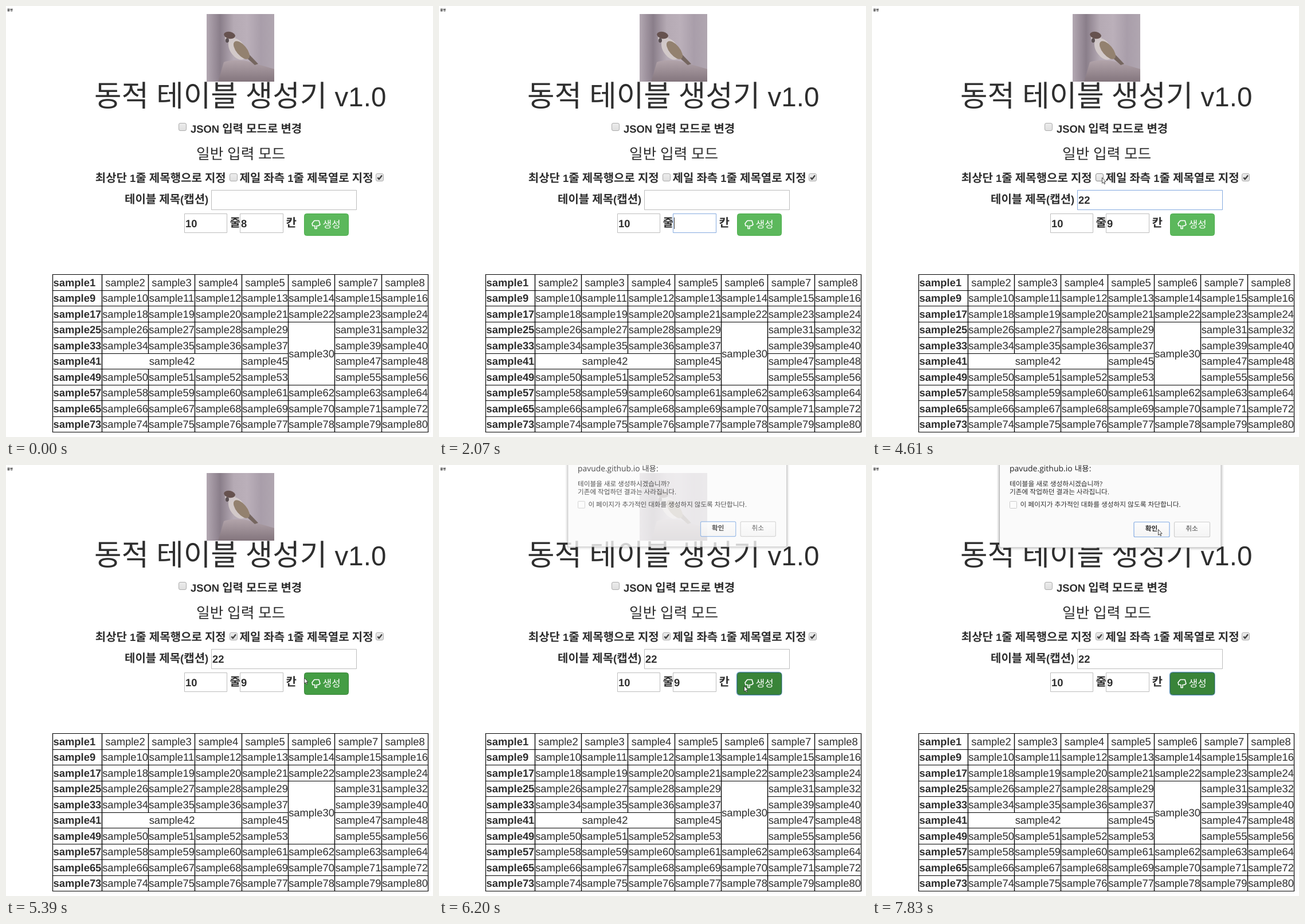
Write an HTML page with a canvas that moves like this. It is 745 px wide and 752 px high and loops after 8000 ms.

```html
<!DOCTYPE html>
<html lang="ko">
<head>
<meta charset="utf-8">
<title>동적 테이블 생성기</title>
<style>
html, body { margin: 0; height: 100%; overflow: hidden; background: #fff; }
canvas { display: block; }
</style>
</head>
<body>
<canvas id="stage" width="745" height="752"></canvas>
<script>
const ctx = document.getElementById('stage').getContext('2d');
ctx.textRendering = 'geometricPrecision';
const LOOP = 8000, STEP = 70, INK = '#2e2e2e';

// Each glide eases out for `time` ms, then rests until `end`.
const glides = [
  { start: 460, time: 210, end: 900, from: [669, 0], to: [502, 289], power: 1 },
  { start: 3800, time: 350, end: 4750, from: [452, 308], to: [401, 299], power: 2 },
  { start: 4750, time: 210, end: 5020, from: [401, 299], to: [450, 310], power: 1 },
  { start: 5250, time: 550, end: 6550, from: [503, 352], to: [532, 385], power: 3 },
  { start: 6790, time: 900, end: 8000, from: [546, 220], to: [499, 112], power: 6 }
];

const stepped = (t, start) => Math.floor((t - start) / STEP) * STEP;

function pointer(t) {
  const g = glides.find(g => t >= g.start && t < g.end);
  if (!g) return null;
  const p = Math.min(1, stepped(t, g.start) / g.time);
  const eased = 1 - (1 - p) ** g.power;
  return g.from.map((v, i) => Math.round(v + (g.to[i] - v) * eased));
}

// Hangul runs use their own font, `ratio` times the Latin size.
function text(s, x, y, size, { weight = 400, align = 0, color = INK, latin = 'Liberation Sans', ratio = 1.087 } = {}) {
  const parts = s.match(/[가-힣]+|[^가-힣]+/g) || [];
  const fonts = parts.map(p => /[가-힣]/.test(p)
    ? `${weight} ${size * ratio}px "Noto Sans CJK KR", "Noto Sans CJK", sans-serif`
    : `${weight} ${size}px "${latin}", sans-serif`);
  const widths = parts.map((p, i) => (ctx.font = fonts[i], ctx.measureText(p).width));
  x -= align * widths.reduce((a, b) => a + b, 0);
  ctx.fillStyle = color;
  parts.forEach((p, i) => {
    ctx.font = fonts[i];
    ctx.fillText(p, x, y);
    x += widths[i];
  });
}

function paint(fill, stroke, line) {
  if (fill) { ctx.fillStyle = fill; ctx.fill(); }
  if (stroke) { ctx.strokeStyle = stroke; ctx.lineWidth = line; ctx.stroke(); }
}

function box(x, y, w, h, fill, stroke, radius = 0, line = 1) {
  ctx.beginPath();
  ctx.roundRect(x, y, w, h, radius);
  paint(fill, stroke, line);
}

function shape(path, x, y, fill, stroke, line = 1) {
  ctx.save();
  ctx.translate(x, y);
  const p = new Path2D(path);
  if (fill) { ctx.fillStyle = fill; ctx.fill(p); }
  if (stroke) { ctx.strokeStyle = stroke; ctx.lineWidth = line; ctx.lineJoin = 'round'; ctx.stroke(p); }
  ctx.restore();
}

function oval(x, y, rx, ry, turn, fill) {
  ctx.beginPath();
  ctx.ellipse(x, y, rx, ry, turn, 0, 7);
  paint(fill);
}

function gradient(x0, y0, x1, y1, ...colors) {
  const g = ctx.createLinearGradient(x0, y0, x1, y1);
  colors.forEach((c, i) => g.addColorStop(i / (colors.length - 1), c));
  return g;
}

function checkbox(x, y, checked, hover) {
  const fill = gradient(0, y, 0, y + 14, hover ? '#f2f2f2' : '#ededed', '#dedede');
  box(x + .5, y + .5, 13, 13, fill, hover ? '#8c8c8c' : '#adadad', 2.5);
  if (checked) shape('M3.3 7.2L5.8 10.2L11 3.5', x, y, null, '#404040', 2.4);
}

function input(x, y, w, h, value, focused, caret) {
  box(x + .5, y + .5, w, h, '#fff', focused ? '#86abe0' : '#bdbdbd');
  text(value, x + 2, y + 23.5, 18.4, { weight: 700 });
  if (caret) {
    ctx.fillStyle = '#333';
    ctx.fillRect(x + 2 + Math.round(value.length * 10.2), y + 7, 1, 20);
  }
}

function photo() {
  ctx.save();
  ctx.translate(350, 14);
  ctx.beginPath();
  ctx.rect(0, 0, 118, 118);
  ctx.clip();
  box(0, 0, 118, 118, gradient(0, 0, 118, 0, '#b3a8b2', '#8a7e8a', '#b5aab4', '#bbb0ba', '#a99eaa', '#b0a6b0'));
  shape('M20 118L30 84Q45 78 70 82L118 96V118Z', 0, 0, gradient(0, 80, 0, 118, '#b3a5ab', '#83757d'));
  shape('M58 66L68 64L90 87L84 89Z', 0, 0, '#75665f');
  oval(54, 61, 13, 21, -.6, '#d2c9c9');
  oval(61, 63, 9, 19, -.7, '#93816f');
  oval(41, 42, 9, 9, 0, '#d0c7c8');
  oval(40, 37, 10, 6, .2, '#66524f');
  oval(36, 46, 3, 4, 0, '#5a5053');
  ctx.restore();
}

function table() {
  const colX = c => c ? Math.floor(167.25 + 81.3 * (c - 1)) + .5 : 81.5;
  const rowY = r => Math.round(468.4 + 27.5 * r) + .5;
  const spans = { 30: [1, 4], 42: [3, 1] };
  const covered = [38, 43, 44, 46, 54];
  for (let n = 1; n <= 80; n++) {
    if (covered.includes(n)) continue;
    const r = (n - 1) >> 3, c = (n - 1) % 8, [cs, rs] = spans[n] || [1, 1];
    const x = colX(c), y = rowY(r), x2 = colX(c + cs), y2 = rowY(r + rs);
    box(x, y, x2 - x, y2 - y, null, '#000', 0, 1.2);
    const base = (y + y2) / 2 + 6.3;
    if (c) text('sample' + n, (x + x2) / 2, base, 18.4, { align: .5 });
    else text('sample' + n, 82.5, base, 18.4, { weight: 700 });
  }
}

function button(hover, pressed) {
  const [fill, edge] = pressed ? ['#398439', '#2b6a45'] : hover ? ['#449d44', '#398439'] : ['#5cb85c', '#4cae4c'];
  if (pressed) box(519.5, 361.5, 78.5, 40, null, '#6c9fc4', 5, 1.4);
  box(520.5, 362.5, 77, 38, fill, edge, 4);
  shape('M0 5L4 0H12L14 7L11 9H8V14H5V9H1Z', 534, 374.5, null, '#fff', 1.6);
  text('생성', 552.5, 386.5, 15.6, { color: '#fff' });
}

function dialog(p) {
  const say = (s, x, y, size = 11.25, opts) => text(s, x, y, size, { latin: 'Open Sans', ratio: 1.045, ...opts });
  const choice = (x, label, edge, opts) => {
    box(x, 99.5, 62, 26, gradient(0, 99, 0, 125, '#fdfdfd', '#f4f4f4'), edge, 2, 1.2);
    say(label, x + 30.5, 115, 11.25, { align: .5, ...opts });
  };
  ctx.save();
  ctx.globalAlpha = p;
  const zoom = .94 + .06 * p;
  ctx.translate(415.5, 50);
  ctx.scale(zoom, zoom);
  ctx.translate(-415.5, -50);
  for (let i = 1; i < 5; i++) box(222.5 - i, -30, 386.5 + 2 * i, 174 + i, null, `rgba(0,0,0,${.2 / i})`, 2 + i);
  box(222.5, -30, 386.5, 174, '#fafafa', '#bcbcbc', 2);
  say('pavude.github.io 내용:', 240, 11, 14, { color: '#222', ratio: .98 });
  say('테이블을 새로 생성하시겠습니까?', 240, 37);
  say('기존에 작업하던 결과는 사라집니다.', 240, 51);
  box(240.5, 63.5, 12, 12, '#fcfcfc', '#c9c9c9', 1);
  say('이 페이지가 추가적인 대화를 생성하지 않도록 차단합니다.', 258.5, 73);
  choice(457, '확인', '#86aee4', { weight: 700 });
  choice(527.5, '취소', '#cfcfcf', { color: '#444' });
  ctx.restore();
}

function draw(t) {
  const within = (a, b) => t >= a && t < b;
  const label = (s, x, y) => text(s, x, y, 18.4, { weight: 700 });
  const thin = { weight: 300 };
  ctx.fillStyle = '#fff';
  ctx.fillRect(0, 0, 745, 752);

  text('품명', 2, 8.5, 5, { weight: 700 });
  photo();
  text('동적 테이블 생성기 v1.0', 154, 175.3, 47.5, thin);
  checkbox(301, 204, false);
  label('JSON 입력 모드로 변경', 322, 220.6);
  text('일반 입력 모드', 332, 267, 23.7, thin);
  label('최상단 1줄 제목행으로 지정', 155.8, 307);
  checkbox(390, 292, t >= 4680, within(4150, 4820));
  label('제일 좌측 1줄 제목열로 지정', 407.5, 307);
  checkbox(645, 292, true, within(670, 900) || within(3800, 4150) || within(4820, 5020));

  label('테이블 제목(캡션)', 207, 344);
  const caption = '2'.repeat((t >= 3400) + (t >= 3590));
  input(358, 321, 253, 34, caption, within(3300, 4680), within(3300, 3730));
  input(311, 362, 74, 33, '10');
  label('줄', 390.5, 385);
  const columns = t < 2070 ? '8' : t < 2350 ? '' : '9';
  input(408, 362, 75, 33, columns, within(1570, 3300), within(1570, 2880));
  label('칸', 488.5, 385);
  button(t >= 5320, t >= 5950);
  table();

  const fade = Math.min(1, stepped(t, 6060) / 175);
  if (fade > 0) dialog(fade);
  const at = pointer(t);
  if (at) shape('M.5.5V10.3L2.7 8.4L4.3 11.8L5.7 11.2L4.2 7.8L7.1 7.6Z', ...at, '#fff', '#333', .9);
}

const begin = performance.now();
function tick() {
  draw((performance.now() - begin) % LOOP);
  requestAnimationFrame(tick);
}
tick();
</script>
</body>
</html>
```
